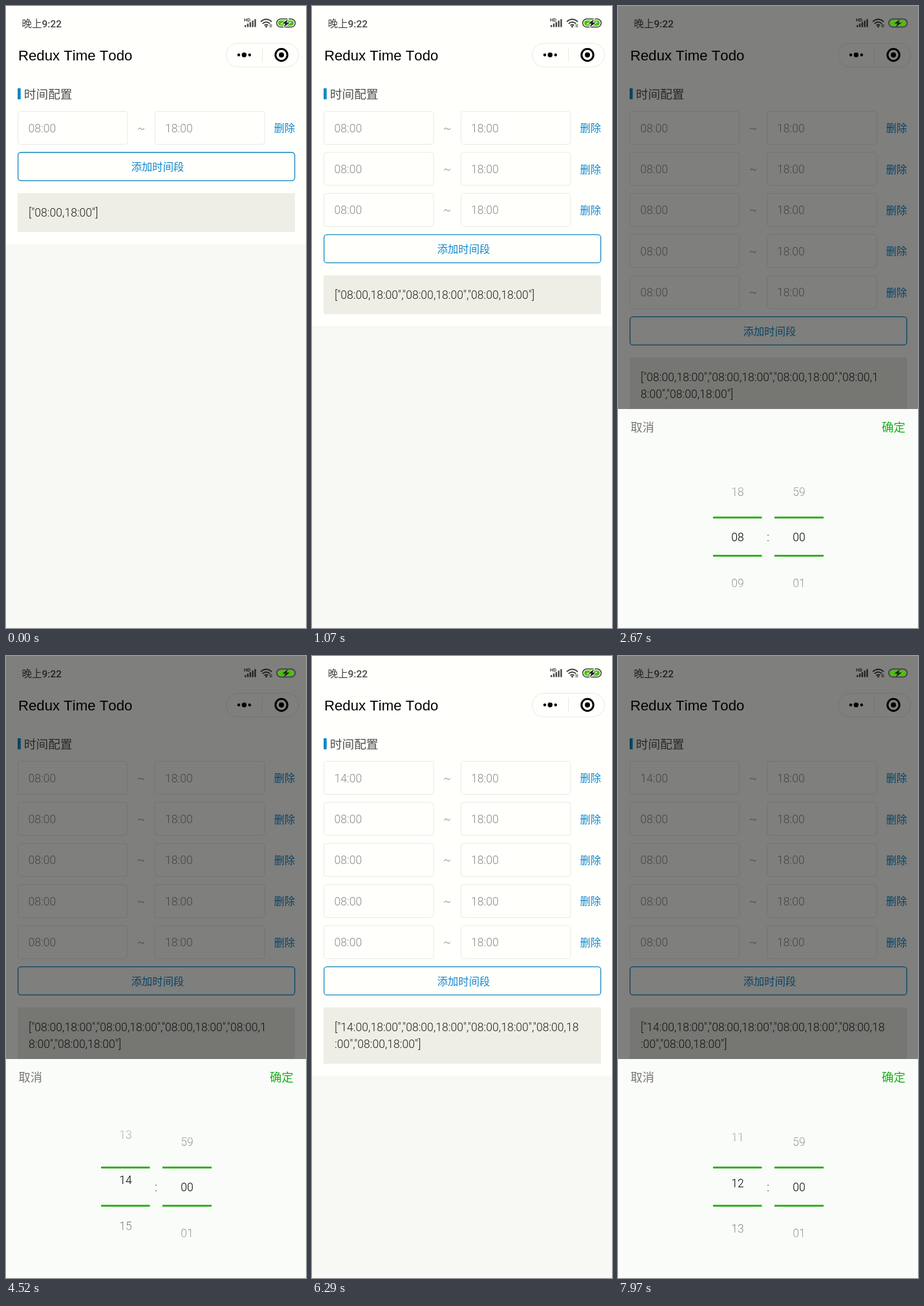
An HTML page for the animation above (8 s loop, 464 by 960 pixels).

```html
<!DOCTYPE html>
<html lang="zh-CN">
<head>
<meta charset="utf-8">
<title>Redux Time Todo</title>
<style>
  html, body { margin: 0; width: 100%; height: 100%; overflow: hidden; background: #f8f8f5; }
  svg { display: block; width: 464px; height: 960px; }
  text { font: 300 17.6px Roboto, "Noto Sans CJK SC", "Noto Sans CJK", sans-serif; white-space: pre; }
  .mid { text-anchor: middle; }
  .title { font: 400 22.2px "Liberation Sans", sans-serif; font-kerning: none; }
  .val { fill: #8c8c8c; }
  .link { fill: #1088cc; font-size: 16.3px; }
  .line { fill: none; stroke: #e8e8e4; }
</style>
</head>
<body>
<svg viewBox="0 0 464 960">
  <defs>
    <linearGradient id="fade" x1="0" y1="0" x2="0" y2="1">
      <stop offset="0" stop-color="#fafcf9" stop-opacity=".92"/>
      <stop offset="1" stop-color="#fafcf9" stop-opacity=".25"/>
    </linearGradient>
    <clipPath id="slot"><rect x="140" y="715" width="190" height="210"/></clipPath>
  </defs>
  <rect width="464" height="960" fill="#f8f8f5"/>
  <rect id="sheet" width="464" height="367" fill="#fffffc"/>

  <text x="24.5" y="32.5" style="font-size:15.5px;font-weight:500" fill="#444">晚上9:22</text>
  <text x="368" y="24" style="font-size:7.5px;font-weight:700" fill="#444">HD</text>
  <g id="bars" fill="#444"></g>
  <g fill="none" stroke="#444" stroke-width="1.9">
    <path d="M394 24.2Q402.5 16.8 411 24.2M396.8 27.2Q402.5 22.2 408.2 27.2M399.5 30.1Q402.5 27.4 405.5 30.1"/>
    <path d="M408.5 28v5M410.7 28v5" stroke-width="1"/>
  </g>
  <circle cx="402.5" cy="31.8" r="1.5" fill="#444"/>

  <text class="title" x="19" y="84">Redux Time Todo</text>
  <rect class="line" x="340.5" y="57.5" width="112" height="36.5" rx="18.25"/>
  <path class="line" d="M396.5 64v23"/>
  <circle cx="360" cy="75.5" r="2.2"/><circle cx="368.3" cy="75.5" r="3.7"/><circle cx="376.8" cy="75.5" r="2.2"/>
  <circle cx="426" cy="75.5" r="9.2" fill="none" stroke="#000" stroke-width="3"/>
  <circle cx="426" cy="75.5" r="4"/>

  <rect x="18" y="127" width="4.7" height="17" fill="#1088c4"/>
  <text x="27.8" y="142.5" style="font-size:18.7px" fill="#505050">时间配置</text>

  <g id="rows"></g>
  <g id="foot">
    <rect x="18.6" y="226" width="428" height="43.6" rx="4.5" fill="none" stroke="#1088c4" stroke-width="1.3"/>
    <text class="link mid" x="234.5" y="254">添加时间段</text>
    <rect id="codeBox" x="18" y="288.8" width="429" height="60" fill="#eeeee6"/>
    <text id="code1" x="35" y="325" fill="#222"></text>
    <text id="code2" x="35" y="351.4" fill="#222"></text>
  </g>

  <rect id="dim" width="464" height="960"/>
  <rect x="418.7" y="20" width="28.6" height="12.6" rx="6.3" fill="none" stroke="#3c3c3c" stroke-width="1.5"/>
  <rect x="421" y="22.2" width="24" height="8.2" rx="4.1" fill="#48c400"/>
  <path id="gap" d="M436 20.5l-9 6.7h5l-2.5 5.5 9.5-7.2h-5z" fill="none" stroke="#f8fff0" stroke-width="2"/>
  <path d="M436 20.5l-9 6.7h5l-2.5 5.5 9.5-7.2h-5z" fill="#222"/>

  <g id="panel">
    <rect y="622" width="464" height="340" fill="#fafcf9"/>
    <text x="19.5" y="657" style="font-size:18.3px" fill="#777">取消</text>
    <text x="408" y="657" style="font-size:18.3px;font-weight:400" fill="#1aad19">确定</text>
    <g clip-path="url(#slot)">
      <g id="hours"></g>
      <g id="minutes"></g>
      <rect x="140" y="715" width="190" height="74" fill="url(#fade)"/>
      <rect x="140" y="715" width="190" height="76" fill="url(#fade)" transform="matrix(1 0 0 -1 0 1640)"/>
    </g>
    <path d="M147 789.5h75.5M147 848.5h75.5M242 789.5h76M242 848.5h76" stroke="#36b224" stroke-width="3"/>
    <text class="mid" x="232" y="825.5" fill="#222">:</text>
  </g>
</svg>
<script>
const LOOP = 8000, PITCH = 63.4, GAP = 70.5;
const ADDS = [400, 920, 1440, 1980];
const OPENS = [[2490, 5400], [6400, 9000]];   // picker shown from, until
const SLIDE = 170;
// start time, duration, first hour, last hour (18 wraps on to 08)
const DRAGS = [[3330, 1339, 19, 14], [7230, 803, 18, 12]];

const $ = id => document.getElementById(id);
const clamp = v => Math.max(0, Math.min(1, v));
const mod = (v, n) => ((v % n) + n) % n;
const two = v => String(v).padStart(2, '0');
const sine = u => (1 - Math.cos(Math.PI * clamp(u))) / 2;

function add(parent, tag, attrs, text) {
  const el = document.createElementNS('http://www.w3.org/2000/svg', tag);
  for (const k in attrs) el.setAttribute(k, attrs[k]);
  if (text) el.textContent = text;
  return parent.appendChild(el);
}

for (let i = 0; i < 5; i++)
  add($('bars'), 'rect', { x: 369 + i * 3.8, y: 29.5 - i * 2.3, width: 2.4, height: 3 + i * 2.3 });

const rows = [0, 1, 2, 3, 4].map(i => {
  const g = add($('rows'), 'g', { transform: `translate(0 ${i * PITCH})` });
  for (const x of [18.5, 230.5])
    add(g, 'rect', { class: 'line', x, y: 162.5, width: 169.5, height: 51, rx: 4 });
  const start = add(g, 'text', { class: 'val', x: 34.5, y: 194.5 }, '08:00');
  add(g, 'text', { class: 'val mid', x: 209, y: 194.5 }, '~');
  add(g, 'text', { class: 'val', x: 246, y: 194.5 }, '18:00');
  add(g, 'text', { class: 'link', x: 414.5, y: 194.3 }, '删除');
  return { g, start };
});

const wheel = (id, x) => [-2, -1, 0, 1, 2].map(() => add($(id), 'text', { class: 'mid', x }));
const hours = wheel('hours', 185), minutes = wheel('minutes', 280);

function turn(cells, pos, label) {
  const base = Math.round(pos);
  cells.forEach((c, k) => {
    const i = base + k - 2;
    c.textContent = two(label(i));
    c.setAttribute('y', 826 + (i - pos) * GAP);
  });
}

function draw(t) {
  const n = 1 + ADDS.filter(a => t >= a).length;
  const first = t >= OPENS[0][1] ? '14:00' : '08:00';
  rows.forEach((r, i) => r.g.setAttribute('display', i < n ? 'inline' : 'none'));
  rows[0].start.textContent = first;

  const list = JSON.stringify(rows.slice(0, n).map((r, i) => (i ? '08:00' : first) + ',18:00'));
  const cut = first === '14:00' ? 52 : 51;
  const wrapped = list.length > cut;
  $('code1').textContent = list.slice(0, cut);
  $('code2').textContent = list.slice(cut);
  $('codeBox').setAttribute('height', wrapped ? 87 : 60);
  $('foot').setAttribute('transform', `translate(0 ${(n - 1) * PITCH})`);
  $('sheet').setAttribute('height', 367 + (n - 1) * PITCH + (wrapped ? 27 : 0));

  let open = 0;
  for (const [a, b] of OPENS)
    open = Math.max(open, Math.min(sine((t - a) / SLIDE), 1 - sine((t - b) / SLIDE)));
  $('dim').setAttribute('opacity', open * 0.5);
  $('gap').setAttribute('opacity', 1 - open);
  $('panel').setAttribute('transform', `translate(0 ${(1 - open) * 340})`);

  const [from, span, a, b] = DRAGS[t < 6000 ? 0 : 1];
  turn(hours, a + (b - a) * sine((t - from) / span), i => 8 + mod(i - 8, 11));
  turn(minutes, 0, i => mod(i, 60));
}

const begin = performance.now();
function tick(now) {
  draw(Math.max(0, now - begin) % LOOP);
  requestAnimationFrame(tick);
}
draw(0);
requestAnimationFrame(tick);
</script>
</body>
</html>
```
